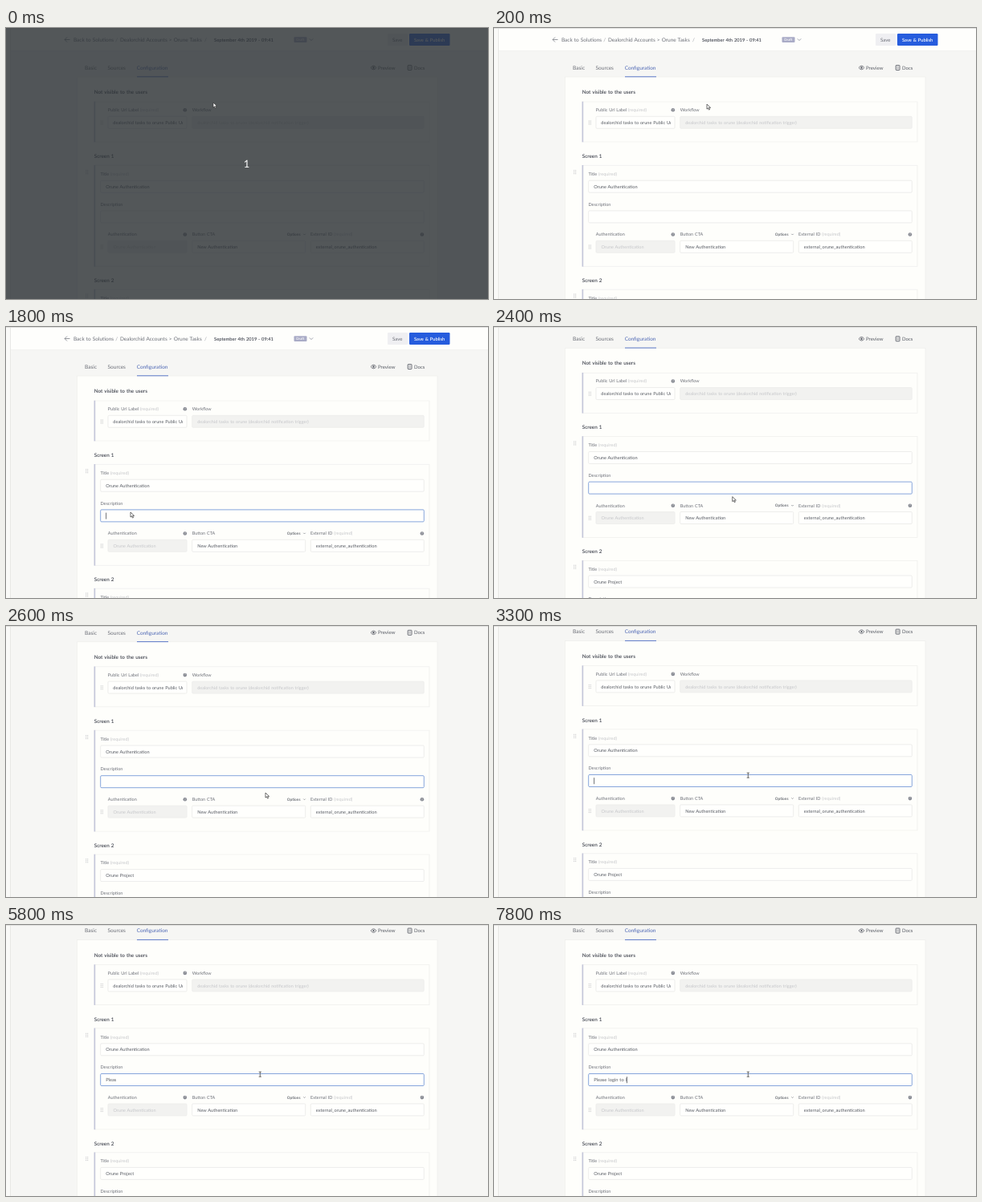
Recreate the animation shown at these times as an HTML page. Size 600 px wide and 338 px high, loop 8 s.

```html
<!DOCTYPE html>
<html lang="en">
<head>
<meta charset="utf-8">
<title>Form configuration</title>
<style>
  html, body { margin: 0; width: 100%; height: 100%; overflow: hidden; background: #f6f6f4; }
  svg { display: block; width: 600px; height: 338px; }
  text {
    font-family: Lato, "Open Sans", sans-serif;
    text-rendering: geometricPrecision;
    word-spacing: .07em;
    white-space: pre;
  }
</style>
</head>
<body>
<svg id="stage" viewBox="0 0 600 338"></svg>
<script>
const NS = 'http://www.w3.org/2000/svg';
const stage = document.getElementById('stage');
const INK = '#565a63', LABEL = '#6b6e77', HEAD = '#40444f', PALE = '#c5c6c9', BLUE = '#4c66b4';

function el(tag, attrs, parent) {
  const node = document.createElementNS(NS, tag);
  for (const key in attrs) node.setAttribute(key, attrs[key]);
  parent.appendChild(node);
  return node;
}

const page = el('g', {}, stage);

const rect = (x, y, width, height, fill, more = {}, parent = page) =>
  el('rect', { x, y, width, height, fill, ...more }, parent);

const path = (d, stroke, width = .8, more = {}, parent = page) =>
  el('path', { d, stroke, fill: 'none', 'stroke-width': width, ...more }, parent);

// y is the middle of the line of text
function text(x, y, str, size, fill, weight = 400, parent = page) {
  const node = el('text', { x, y: y + size * .35, fill, 'font-size': size, 'font-weight': weight }, parent);
  node.textContent = str;
  return node;
}

function label(x, y, str, required) {
  const node = text(x, y, str, 5.5, LABEL);
  if (required) el('tspan', { fill: PALE }, node).textContent = ' (required)';
}

function field(x, y, width, str, disabled) {
  const box = rect(x, y, width, 15, disabled ? '#f2f2f0' : '#fffffd',
    { rx: 1.2, stroke: disabled ? '#ededeb' : '#e9e9e7', 'stroke-width': .8 });
  if (str) text(x + 6.5, y + 7.7, str, disabled ? 5.5 : 5.65, disabled ? PALE : INK);
  return box;
}

function help(x, y) {
  el('circle', { cx: x, cy: y, r: 2.3, fill: '#858890' }, page);
  text(x - .85, y, '?', 3.6, '#fff', 700);
}

function grip(x, y) {
  for (let i = 0; i < 6; i++)
    rect(x - 1.5 + (i % 2) * 2, y - 2.5 + (i >> 1) * 2, 1, 1, '#bfc0c4');
}

function section(title, y, top, height) {
  text(109.7, y, title, 6.35, HEAD, 600);
  rect(110, top, 417, height, 'none', { stroke: '#f0f0ee', 'stroke-width': .8 });
  rect(109.6, top - .3, 1.6, height + .6, '#c4c6da');
}

const chevron = (x, y, r, colour) =>
  path(`M${x - r} ${y - r / 2}l${r} ${r}l${r} ${-r}`, colour, .8);

function buildHeader() {
  rect(6, 0, 594, 28.5, '#fefefc');
  rect(6, 28, 594, .7, '#f0f0ee');
  path('M79.5 14.5H73M76 11.5l-3 3l3 3', '#7d8088');
  text(84, 14.5, 'Back to Solutions', 6.45, LABEL);
  text(136.3, 14.5, '/', 6.4, '#9a9ca3');
  text(142, 14.5, 'Dealorchid Accounts > Orune Tasks', 6.45, LABEL);
  text(247, 14.5, '/', 6.4, '#9a9ca3');
  text(259, 14.5, 'September 4th 2019 - 09:41', 5.75, HEAD, 600);
  rect(358.5, 11.3, 16, 6.6, '#a9abc6', { rx: 1 });
  text(361.3, 14.6, 'Draft', 4.4, '#fff', 600);
  chevron(380, 14.5, 2.2, '#8b8e9c');
  rect(475, 7, 25, 15, '#efeff2', { rx: 1.2 });
  text(481, 14.5, 'Save', 6.1, LABEL);
  rect(502, 7, 50.5, 15, '#265cdd', { rx: 1.2 });
  text(508, 14.5, 'Save & Publish', 5.75, '#fff', 600);
}

function buildTabs() {
  text(98, 49.5, 'Basic', 6.6, LABEL);
  text(126.6, 49.5, 'Sources', 6.5, LABEL);
  text(162.7, 49.5, 'Configuration', 6.45, BLUE);
  path('M454 49.5q3.5 -4.6 7 0q-3.5 4.6 -7 0z', '#5c5f68', .8);
  el('circle', { cx: 457.5, cy: 49.5, r: 1.2, fill: '#5c5f68' }, page);
  text(463, 49.5, 'Preview', 6.1, INK);
  rect(500.2, 46.5, 4.8, 6, 'none', { rx: .5, stroke: '#5c5f68', 'stroke-width': .9 });
  path('M501.4 48.6h2.4M501.4 50.4h2.4', '#5c5f68', .6);
  text(508, 49.5, 'Docs', 6, INK);
}

function buildForm() {
  rect(88.5, 61, 448.5, 400, '#fefefb', { stroke: '#eeeeec', 'stroke-width': .7 });
  rect(163, 60.3, 39, 1, '#5c78c8');

  section('Not visible to the users', 80, 92, 50);
  label(126.8, 102.3, 'Public Url Label', true);
  help(222.8, 102.3);
  label(231.7, 102.3, 'Workflow');
  grip(119.3, 118);
  field(127, 110.3, 98);
  const clip = el('clipPath', { id: 'urlClip' }, page);
  rect(132, 110, 88, 16, '#000', {}, clip);
  text(133.3, 118, 'dealorchid tasks to orune Public Url', 5.6, INK).setAttribute('clip-path', 'url(#urlClip)');
  field(231.7, 110.3, 288.5, 'dealorchid tasks to orune (dealorchid notification trigger)', true);

  section('Screen 1', 160, 171.3, 126);
  grip(100.7, 179.7);
  label(117.4, 182, 'Title', true);
  field(117.7, 190.2, 402.6, 'Orune Authentication');
  label(117.4, 219.7, 'Description');
  const description = field(117.7, 227.9, 402.6);
  label(126.8, 257.5, 'Authentication');
  help(222.8, 257.5);
  label(231.7, 257.5, 'Button CTA');
  text(349.8, 257.5, 'Options', 4.7, INK, 600);
  chevron(371.5, 257.4, 1.2, '#85888f');
  label(379, 257.5, 'External ID', true);
  help(517.9, 257.5);
  grip(119.3, 273);
  field(127, 265.3, 98, 'Orune Authentication', true);
  field(231.7, 265.3, 141, 'New Authentication');
  field(379.3, 265.3, 141, 'external_orune_authentication');

  section('Screen 2', 315, 326.2, 126);
  grip(100.7, 334);
  label(117.4, 336.7, 'Title', true);
  field(117.7, 344.8, 402.6, 'Orune Project');
  label(117.4, 374.2, 'Description');
  return description;
}

buildHeader();
buildTabs();
const description = buildForm();
const typed = text(124.2, 235.6, '', 5.75, INK);
const caret = rect(124.2, 231.6, .8, 8, '#4a4d55');

// fixed window edges
rect(0, 0, 5.5, 338, '#fafaf8', {}, stage);
rect(5.2, 0, .8, 338, '#e4e4e2', {}, stage);
rect(0, 0, 600, .9, '#dededc', {}, stage);

const cover = el('g', {}, stage);
rect(0, 0, 600, 338, '#2e3236', { opacity: .82 }, cover);
text(295.7, 169.3, '1', 13, '#fff', 400, cover);

const pointer = path('M0 0V6.1L1.5 4.8L2.5 7.1L3.6 6.6L2.6 4.4H4.6Z', '#333', .7, { fill: '#fff' }, stage);
const beam = path('M-1.6 -3H1.6M0 -3V3M-1.6 3H1.6', '#4a4a4a', .8, {}, stage);

// [ms, value...]: eased from row to row
const CURSOR = [
  [0, 258, 93], [100, 258, 93], [200, 265, 95], [300, 268, 95], [500, 268, 95],
  [1400, 154.5, 227], [1500, 155, 231], [1800, 155, 231], [2600, 323, 208], [2700, 323, 208],
  [2800, 318, 196], [2900, 318, 196], [3000, 317, 187], [3200, 316.6, 186.5], [3300, 316.3, 186.2]
];
const SCROLL = [[1800, 0], [2600, 41.2], [2700, 41.2], [2800, 42.4]];
const CARET = [[1600, 2100], [3300, 3400], [4500, 5800], [6200, 8000]];
const PHRASE = 'Please login to l';
// [ms, letters shown]
const TYPING = [
  [4600, 1], [4700, 2], [4900, 3], [5000, 4], [5200, 5], [6200, 6], [6300, 8], [6600, 9],
  [6800, 10], [7000, 11], [7100, 12], [7200, 14], [7400, 15], [7800, 17]
];

function sample(rows, t) {
  if (t <= rows[0][0]) return rows[0].slice(1);
  for (let i = 1; i < rows.length; i++) {
    const [a, b] = [rows[i - 1], rows[i]];
    if (t <= b[0]) {
      const p = (t - a[0]) / (b[0] - a[0]), e = p * p * (3 - 2 * p);
      return a.slice(1).map((v, k) => v + (b[k + 1] - v) * e);
    }
  }
  return rows[rows.length - 1].slice(1);
}

const show = (node, on) => node.setAttribute('visibility', on ? 'visible' : 'hidden');

function draw(now) {
  const t = Math.floor((now % 8000) / 100) * 100;
  const [x, y] = sample(CURSOR, t);
  page.setAttribute('transform', `translate(0 ${-sample(SCROLL, t)[0]})`);
  show(cover, t < 200);

  const overText = t >= 3000;
  show(pointer, !overText);
  show(beam, overText);
  (overText ? beam : pointer).setAttribute('transform', `translate(${x} ${y})`);

  const focused = t >= 1500;
  description.setAttribute('stroke', focused ? '#86a5dc' : '#e9e9e7');
  description.setAttribute('stroke-width', focused ? 1 : .8);

  const count = TYPING.reduce((n, [at, letters]) => t >= at ? letters : n, 0);
  typed.textContent = PHRASE.slice(0, count);
  caret.setAttribute('x', 124.3 + (count ? typed.getComputedTextLength() : 0));
  show(caret, CARET.some(([on, off]) => t >= on && t < off));
}

const start = performance.now();
function tick() {
  draw(performance.now() - start);
  requestAnimationFrame(tick);
}
tick();
</script>
</body>
</html>
```
